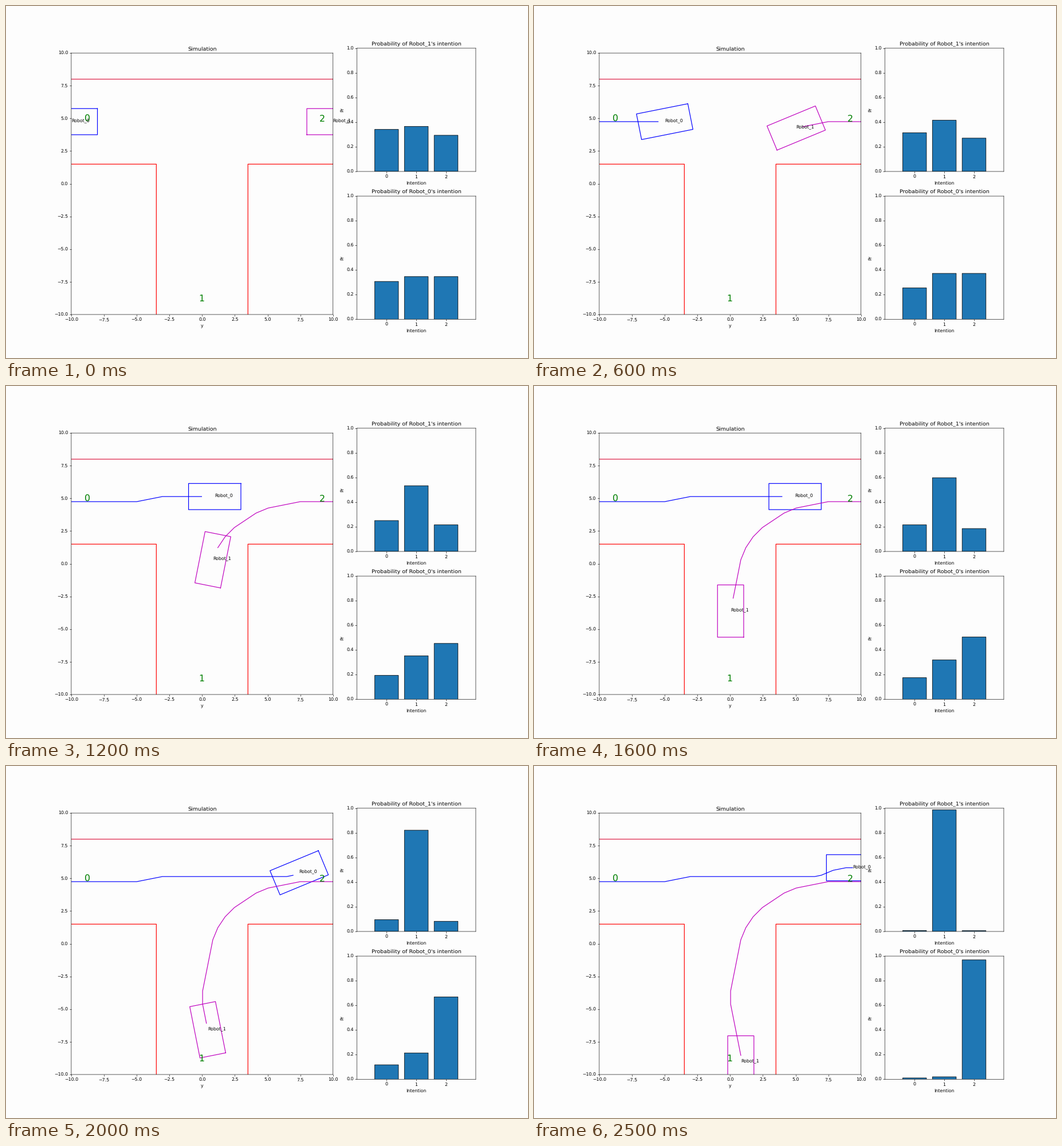
Recreate the animation shown at these times as a matplotlib script. Size 911 by 615 pixels, loop 2.6 s.

```python
import numpy as np
import matplotlib.pyplot as plt
from matplotlib.animation import FuncAnimation

WIDTH, HEIGHT = 911, 615
DPI = WIDTH / 16
FRAMES, INTERVAL = 26, 100
PAPER = "#fdfdfd"
TURN = np.pi / 16
STEPS = np.arange(FRAMES)

# Edges fall between pixels and glyphs stay unhinted, for a soft scaled look.
plt.rcParams.update({"font.family": "DejaVu Sans", "font.size": 10,
                     "figure.facecolor": PAPER, "axes.facecolor": PAPER,
                     "path.snap": False, "text.hinting": "none"})


class Robot:
    """Car that steers in whole turns and leaves a trail one step behind."""

    def __init__(self, ax, name, color, start, base, turns, brake, stop=FRAMES):
        self.angles = base + TURN * np.round(turns)
        slow = (STEPS == 0) | (STEPS == 5) | (STEPS >= brake)
        speed = np.where(slow, .5, 1) * (STEPS < stop)
        moves = speed * np.array([np.cos(self.angles), np.sin(self.angles)])
        self.points = start + np.cumsum(moves, axis=1).T - moves.T
        self.trail, = ax.plot([], [], color=color, lw=1.5)
        self.body, = ax.plot([], [], color=color, lw=1.5)
        self.label = ax.text(*start, name)

    def draw(self, n):
        c, s = np.cos(self.angles[n]), np.sin(self.angles[n])
        corners = np.array([[2, 1], [-2, 1], [-2, -1], [2, -1], [2, 1]])
        outline = corners @ np.array([[c, s], [-s, c]]) + self.points[n]
        self.body.set_data(*outline.T)
        self.trail.set_data(*self.points[:n].T)
        self.label.set_position(self.points[n])


class Belief:
    """Bar chart of a softmax over scores that grow with the evidence."""

    def __init__(self, ax, name, evidence, scores):
        self.evidence, self.scores = evidence, scores
        self.bars = ax.bar(range(3), [0] * 3, color="#1f77b4",
                           edgecolor="black", lw=1)
        ax.set(xlim=(-1, 3), ylim=(0, 1), xticks=range(3),
               yticks=np.arange(6) / 5, xlabel="Intention", ylabel="Pr",
               title=f"Probability of {name}'s intention")

    def draw(self, n):
        gain = np.interp(n, [4, 8, 16, 20, 25], self.evidence)
        weights = np.exp(self.scores(gain))
        for bar, height in zip(self.bars, weights / weights.sum()):
            bar.set_height(height)


def bump(center, width):
    return np.exp(-((STEPS - center) / width) ** 2)


fig = plt.figure(figsize=((WIDTH + .001) / DPI, (HEIGHT + .001) / DPI), dpi=DPI)
grid = fig.add_gridspec(2, 3, left=.125, right=.9, bottom=.11, top=.88,
                        wspace=.2, hspace=.2)

road = fig.add_subplot(grid[:, :2], aspect="equal")
ticks = np.arange(-10, 10.1, 2.5)
road.set(xlim=(-10, 10), ylim=(-10, 10), xticks=ticks, yticks=ticks,
         title="Simulation", xlabel="y")
road.plot([-10, 10], [8, 8], color="crimson", lw=1.5)
for side in (-1, 1):
    road.plot([10 * side, 3.5 * side, 3.5 * side], [1.5, 1.5, -10],
              color="red", lw=1.5)
for goal, (x, y) in enumerate([(-9, 4.75), (-.27, -9), (8.97, 4.75)]):
    road.text(x, y, str(goal), color="green", fontsize=20)

swerves = bump(6.5, 1) + 2 * bump(19.9, 1.9)
left_turn = np.interp(STEPS, [2, 5, 8, 12, 15, 17, 22, 25],
                      [.3, 1.4, 3.4, 7.2, 7.2, 9, 9, 8])
parts = [
    Robot(road, "Robot_0", "b", (-10, 4.75), 0, swerves, brake=17, stop=24),
    Robot(road, "Robot_1", "m", (10, 4.75), np.pi, left_turn, brake=18),
    Belief(fig.add_subplot(grid[0, 2]), "Robot_1", [.07, .49, 1.02, 2.15, 4.94],
           lambda gain: np.array([0, gain, -.15])),
    Belief(fig.add_subplot(grid[1, 2]), "Robot_0", [.12, .64, 1.06, 1.74, 4.48],
           lambda gain: np.array([0, min(gain, .6), gain])),
]


def update(n):
    for part in parts:
        part.draw(n)
    return []


anim = FuncAnimation(fig, update, frames=FRAMES, interval=INTERVAL,
                     repeat=True, repeat_delay=0, blit=False)
plt.show()
```
